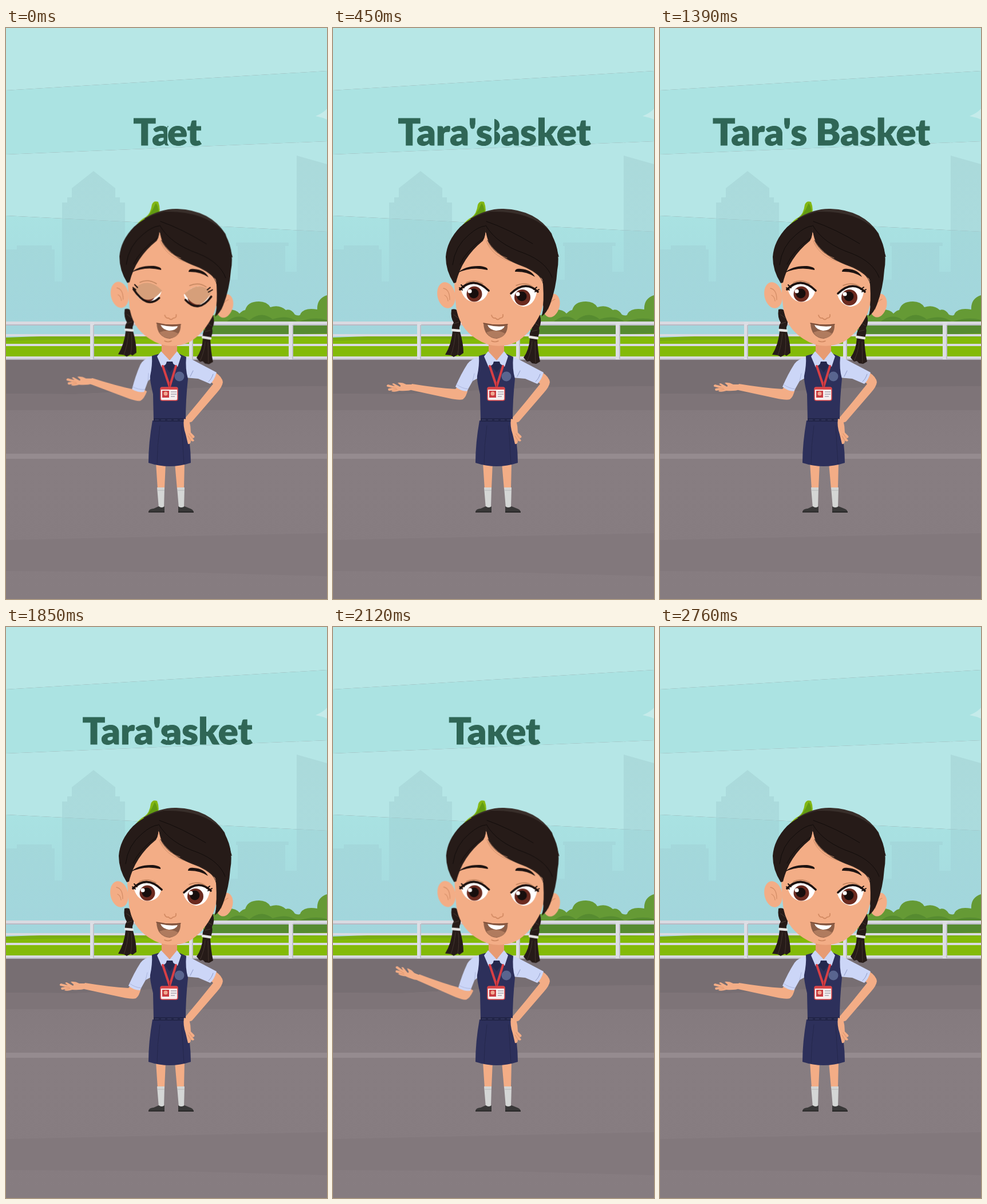
Recreate the animation shown at these times as an HTML page. Size 561x998 px, loop 2.79 s.

```html
<!DOCTYPE html>
<html lang="en">
<head>
<meta charset="utf-8">
<title>Schoolgirl presenting a title</title>
<style>
  html, body { margin: 0; width: 100%; height: 100%; overflow: hidden; background: #857b7f; }
  svg { display: block; width: 100%; height: 100%; }

  .skin { fill: #f3ad86; }
  .hair { fill: #261b18; }
  .navy { fill: #2d305b; }
  .shirt { fill: #ccd6f7; }
  .line { fill: none; stroke-linecap: round; stroke-linejoin: round; }
  .title { font: 900 65px Lato, "Open Sans", sans-serif; fill: #2f6656; stroke: #2f6656; stroke-width: 1; text-anchor: middle; }

  .title, .head, .arm, .forearm, .hand, .lid, .lash { animation: 2790ms linear infinite; }

  /* The two halves of the title slide out of, and back into, the middle. */
  .title { animation-name: slide; }
  .from-left { --hidden: 205px; --start: 131px; }
  .from-right { --hidden: -205px; --start: -131px; }
  @keyframes slide {
    0% { transform: translateX(var(--start)); animation-timing-function: cubic-bezier(.333, 1, .667, 1); }
    35.84% { transform: none; }
    59.86% { transform: none; animation-timing-function: cubic-bezier(.33, .28, .67, .63); }
    88.2%, 100% { transform: translateX(var(--hidden)); }
  }

  .head { transform-origin: 285px 560px; animation-name: nod; }
  @keyframes nod {
    0%, 71.7% { transform: rotate(.45deg); }
    9.7%, 66.3%, 81.4%, 100% { transform: none; }
  }

  .arm, .forearm, .hand { animation-timing-function: ease-in-out; }
  .arm { transform-origin: 245px 590px; animation-name: shoulder; }
  .forearm { transform-origin: 225px 643px; animation-name: elbow; }
  .hand { transform-origin: 137px 628px; animation-name: wrist; }
  @keyframes shoulder {
    0%, 71.7% { transform: rotate(-9deg); }
    9.7%, 81.4% { transform: rotate(-5deg); }
    15.8%, 66.3%, 87.5%, 100% { transform: rotate(0deg); }
  }
  @keyframes elbow {
    0%, 71.7% { transform: rotate(17.5deg); }
    9.7%, 81.4% { transform: rotate(21deg); }
    15.8%, 66.3%, 87.5%, 100% { transform: rotate(0deg); }
  }
  @keyframes wrist {
    0%, 71.7% { transform: rotate(-8deg); }
    9.7%, 81.4% { transform: rotate(37deg); }
    15.8%, 66.3%, 87.5%, 100% { transform: rotate(0deg); }
  }

  .lid { fill: #d69f7a; }
  .lash { fill: none; stroke: #1d1311; stroke-width: 3.6; stroke-linecap: round; }
  .lid.l { animation-name: lid-l; }
  .lid.r { animation-name: lid-r; }
  .lash.l { animation-name: lash-l; }
  .lash.r { animation-name: lash-r; }
  @keyframes lid-l {
    0% { d: path("M222 457Q246 433 272 459Q246 493 222 457Z"); }
    5%, 100% { d: path("M222 457Q246 433 272 459Q246 433 222 457Z"); }
  }
  @keyframes lid-r {
    0% { d: path("M311 464Q336 440 358 461Q336 504 311 464Z"); }
    5%, 100% { d: path("M311 464Q336 440 358 461Q336 440 311 464Z"); }
  }
  @keyframes lash-l {
    0% { d: path("M222 457Q246 493 267 472"); }
    5%, 100% { d: path("M222 457Q246 433 272 459"); }
  }
  @keyframes lash-r {
    0% { d: path("M313 475Q336 500 358 469"); }
    5%, 100% { d: path("M311 464Q336 440 358 461"); }
  }
</style>
</head>
<body>
<svg viewBox="0 0 561 998" preserveAspectRatio="none">
  <defs>
    <linearGradient id="low-sky" x1="0" y1="0" x2="0" y2="1">
      <stop stop-color="#a9e2e2"/><stop offset="1" stop-color="#a3d6dd"/>
    </linearGradient>
    <linearGradient id="city" gradientUnits="userSpaceOnUse" x1="0" y1="225" x2="0" y2="540">
      <stop stop-color="#9cc9cb" stop-opacity=".42"/>
      <stop offset="1" stop-color="#a1d4dc" stop-opacity=".5"/>
    </linearGradient>
    <linearGradient id="road" x1="0" y1="0" x2="0" y2="1">
      <stop stop-color="#81777b"/><stop offset=".4" stop-color="#877d81"/><stop offset="1" stop-color="#867c80"/>
    </linearGradient>
    <clipPath id="left-half"><path d="M0 130H282V230H0Z"/></clipPath>
    <clipPath id="right-half"><path d="M282 130H561V230H282Z"/></clipPath>
  </defs>

  <g id="sky">
    <path fill="#b7e7e6" d="M0 0H561V75L0 109Z"/>
    <path fill="#abe3e2" d="M0 109L561 75V198L0 221Z"/>
    <path fill="#b5e6e6" d="M0 221L561 198V356L0 328Z"/>
    <path fill="url(#low-sky)" d="M0 328L561 356V580H0Z"/>
    <path fill="#c5ebea" d="M541 154Q554 149 561 141V160Q552 156 541 154Z"/>
    <path fill="url(#city)" d="M0 387H19V380H80V387H85V443H98V305H107V296H115V280L153 250L191 280V296H199V305H208V440H405V381H402V375H494V381H488V426H508V223L561 238V580H0Z"/>
  </g>

  <g id="park">
    <path fill="#659a35" d="M345 540V508Q352 500 364 502Q370 490 390 492Q402 492 408 499Q414 493 418 493Q422 478 442 478Q456 478 462 488Q478 483 489 493Q498 490 505 501Q514 505 515 499Q522 488 544 492Q543 473 561 467V540Z"/>
    <path fill="#568b30" d="M345 540V520Q365 508 382 516Q405 496 425 511Q446 493 466 509Q493 500 510 514Q535 504 561 510V540Z"/>
    <path fill="#79ad12" d="M0 541Q150 535 280 540L561 534V580H0Z"/>
    <path fill="#83ba08" d="M0 547Q150 541 280 545L561 540V580H0Z"/>
  </g>

  <g id="street">
    <path fill="url(#road)" d="M0 579H561V998H0Z"/>
    <path fill="#776e72" d="M0 579H561V626L360 628L120 640L0 639Z"/>
    <path fill="#7e7478" d="M0 639L120 640L360 628L561 626V668L0 668Z"/>
    <path fill="#958b8f" d="M0 744H561V753H0Z"/>
    <path fill="#82787c" d="M0 895L561 883V958L300 951L0 949Z"/>
  </g>

  <g id="railing">
    <path fill="#d9dae1" d="M0 513H561V519H0ZM0 535H561V539H0ZM0 552H561V556H0ZM0 574H561V580H0Z"/>
    <path fill="#b9bac4" d="M0 518H561V520H0ZM0 578H561V580H0Z"/>
    <path fill="#dddee4" d="M147 514H154V579H147ZM320 514H327V579H320ZM494 514H502V579H494Z"/>
    <path fill="#bfc0c9" d="M152 519H154V579H152ZM325 519H327V579H325ZM500 519H502V579H500Z"/>
  </g>

  <g clip-path="url(#left-half)"><text class="title from-left" x="282" y="205">Tara's Basket</text></g>
  <g clip-path="url(#right-half)"><text class="title from-right" x="282" y="205">Tara's Basket</text></g>

  <g id="legs">
    <path class="skin" d="M262 760H279L277 806H265ZM295 760H312L311 806H299Z"/>
    <path fill="#d4d6d5" d="M264 803H277L276 839H267ZM299 803H312L311 839H302Z"/>
    <path stroke="#b5b8b8" d="M265 808H277M299 808H312"/>
    <path fill="#393838" d="M267 836Q272 840 277 836L277 846H249Q249 841 258 840ZM301 836Q306 840 312 836L322 840Q328 842 328 847H301Z"/>
    <path stroke="#242323" stroke-width="1.5" d="M249 846H277M301 846H328"/>
  </g>

  <g class="arm">
    <g class="forearm">
      <g class="hand skin">
        <path d="M140 623L128 623Q121 619 113 620L116 623Q120 625 117 627L106 621L103 622L108 626L96 623Q92 625 95 627L104 629L97 630Q95 633 98 634L104 633L102 635Q107 637 116 634Q130 635 140 632Z"/>
        <path class="line" stroke="#d98e67" stroke-width=".8" d="M104 629L111 630M105 633L112 632"/>
      </g>
      <path class="skin" d="M138 622Q180 629 214 631L220 624L236 631Q233 645 227 649Q221 651 202 647L137 633Q134 627 138 622Z"/>
    </g>
    <path class="shirt" d="M257 575Q243 577 235 587Q224 604 214 627Q222 634 234 635Q239 626 244 617L257 610Z"/>
    <path class="line" stroke="#aab5dd" d="M216 623Q225 630 236 631M244 617L247 604"/>
  </g>

  <g id="right-arm">
    <path class="skin" d="M366 602Q378 610 379 619Q378 627 369 637L325 688Q316 692 312 683L337 653L362 622L353 614Z"/>
    <path class="shirt" d="M305 572Q320 576 330 582L368 602Q364 616 357 622L336 613L314 611Z"/>
    <path class="line" stroke="#8f9bc8" d="M362 605Q359 614 354 618M322 609L327 599"/>
  </g>

  <g id="body">
    <path fill="#e79b73" d="M272 545H299V580L286 589L272 578Z"/>
    <path class="navy" d="M255 573L269 569L286 584L302 569L315 575Q313 596 318 613Q314 650 314 686H258L257 640Q251 615 252 608Q256 590 255 573Z"/>
    <path class="shirt" d="M271 565L286 581L299 565L306 574L300 592L286 583L272 593L264 574Z"/>
    <path fill="#24274d" d="M281 583H291L294 592L286 602L278 592Z"/>
    <path class="line" stroke="#d83f45" stroke-width="4" stroke-linecap="butt" d="M274 591L286 627L297 591"/>
    <path stroke="#ad2c35" stroke-width="2" d="M286 619V630"/>
    <rect x="270" y="628" width="30" height="23" rx="3" fill="#f6eeee" stroke="#d9474a" stroke-width="1.5"/>
    <path fill="#d9474a" d="M270 628H300V632H270Z"/>
    <rect x="273" y="634" width="12" height="12" fill="#c93b40"/>
    <circle cx="279" cy="639" r="3.5" fill="#f0a891"/>
    <path stroke="#a9a6b3" stroke-width="1.3" d="M288 636H298M288 640H298M288 644H295"/>
    <circle cx="303" cy="609" r="8.5" fill="#59658f"/>
    <path class="navy" d="M256 686H314Q323 725 323 760Q286 772 249 760Q249 725 256 686Z"/>
    <path class="line" stroke="#25284d" d="M269 695Q264 730 264 763M307 695L311 762"/>
    <path fill="#222548" d="M258 682H314V688H258Z"/>
    <path stroke="#3e426c" stroke-dasharray="7 4" d="M260 685H312"/>
    <path class="skin" d="M311 683L320 685Q323 696 323 707L329 713Q331 716 326 717L329 721Q327 724 323 721Q323 728 318 727L314 710Q309 696 311 683Z"/>
    <path class="line" stroke="#d98e67" d="M320 709L326 717M318 713L323 721"/>
  </g>

  <g class="head">
    <path fill="#83b713" d="M226 345Q235 334 242 331Q251 325 253 309Q256 301 264 304Q269 317 265 327L250 344Z"/>
    <path fill="#629b12" d="M236 339Q250 329 260 306Q267 316 264 329L245 345Z"/>

    <g id="braids">
      <path class="hair" d="M207 492Q218 488 220 503Q226 512 221 523L221 531H209Q206 522 211 515Q205 506 207 492ZM361 500Q366 514 360 524Q362 533 357 543H344Q342 532 348 526Q345 516 350 507Z"/>
      <path class="line" stroke="#493a33" d="M211 501L219 507M211 517L220 514M351 515L359 520M348 530L357 528"/>
      <path class="hair" d="M209 530L222 531Q228 552 228 568L221 573L218 571L211 575L206 572L196 571Q207 553 209 530ZM344 542L357 544Q358 565 362 583L355 587L348 586L344 582L339 583L333 576Q343 562 344 542Z"/>
      <path class="line" stroke="#43352f" d="M214 534Q212 556 206 572M219 535Q221 555 218 570M348 548Q347 565 339 582M353 549L354 585"/>
      <path class="line" stroke="#e5e4e2" stroke-width="4.5" d="M209 528L221 529M344 540L357 542"/>
    </g>

    <g id="face">
      <ellipse class="skin" cx="198" cy="467" rx="15.5" ry="23" transform="rotate(-12 198 467)"/>
      <ellipse class="skin" cx="382" cy="485" rx="14" ry="21" transform="rotate(15 382 485)"/>
      <path class="line" stroke="#d58e67" stroke-width="1.3" d="M193 455Q204 457 204 475M195 467Q200 469 201 477M388 474Q377 478 376 492"/>
      <path class="skin" d="M264 335L212 420Q211 450 215 486Q219 523 250 543Q283 565 320 549Q347 533 363 498L375 455V395Z"/>
    </g>

    <g id="hair">
      <path fill="#382e2a" d="M240 333Q270 315 298 316Q355 318 382 359L395 400L275 365Z"/>
      <path class="hair" d="M266 346Q268 363 262 372Q225 402 215 445L211 446Q197 424 197 400Q199 372 222 348Q244 328 275 321Q342 319 377 353Q399 385 392 423Q390 455 379 484Q374 497 365 504Q368 490 368 476Q373 454 365 438Q350 423 328 415Q287 399 272 374Q267 361 266 346Z"/>
      <path class="line" stroke="#110c0b" d="M266 346Q254 347 238 361Q213 381 209 414M267 345Q285 377 335 394Q373 409 383 436M268 338Q306 351 349 377M263 367Q232 390 222 413"/>
      <path class="line" stroke="#392b25" d="M270 371Q283 400 337 418Q367 430 369 455"/>
      <path class="line" stroke="#c98964" stroke-width=".8" d="M268 372Q276 397 310 408M270 376Q284 396 304 402"/>
      <path class="hair" d="M366 435Q378 460 367 487Q369 466 366 435Z"/>
    </g>

    <g id="eyes">
      <path fill="#fff" d="M224 459Q246 433 271 460Q267 478 248 479Q230 478 224 459Z"/>
      <path fill="#fff" d="M310 466Q334 439 356 462Q352 485 333 487Q315 484 310 466Z"/>
      <g fill="#6b2b20"><circle cx="247" cy="465" r="13.5"/><circle cx="331" cy="471" r="14"/></g>
      <g fill="#170e0d"><circle cx="246" cy="464" r="8.5"/><circle cx="330" cy="469" r="8.5"/></g>
      <g fill="#fff"><circle cx="239" cy="460" r="3.6"/><circle cx="323" cy="465" r="3.6"/></g>
      <path class="lid l"/><path class="lid r"/>
      <path class="lash l"/><path class="lash r"/>
      <path class="line" stroke="#1d1311" stroke-width="2" d="M226 458L221 454M229 454L224 449M353 461L360 457M351 457L356 453"/>
      <path class="line" stroke="#be815b" stroke-width="1.5" d="M233 445Q247 438 262 447M320 450Q336 443 349 452"/>
      <path fill="#1d1311" d="M218 428Q231 415 257 416Q272 418 270 423Q242 416 218 428ZM318 426Q318 420 328 421Q346 422 353 435Q338 425 318 426Z"/>
    </g>

    <path class="line" stroke="#d28a62" stroke-width="1.8" d="M277 502Q279 508 284 507Q288 512 292 507Q298 507 297 501"/>
    <path fill="#8d5f48" d="M263 516Q284 521 305 518Q306 539 286 543Q264 541 263 516Z"/>
    <path fill="#b07b5e" d="M268 532Q284 525 301 534Q295 543 284 542Q273 541 268 532Z"/>
    <path fill="#fff" d="M270 519Q286 523 300 521Q298 528 285 529Q273 527 270 519Z"/>
    <path class="line" stroke="#774934" stroke-width="1.5" d="M263 516Q284 521 305 518"/>
    <path class="line" stroke="#ce865f" stroke-width="1.5" d="M277 547Q283 550 289 547"/>
  </g>
</svg>
</body>
</html>
```
